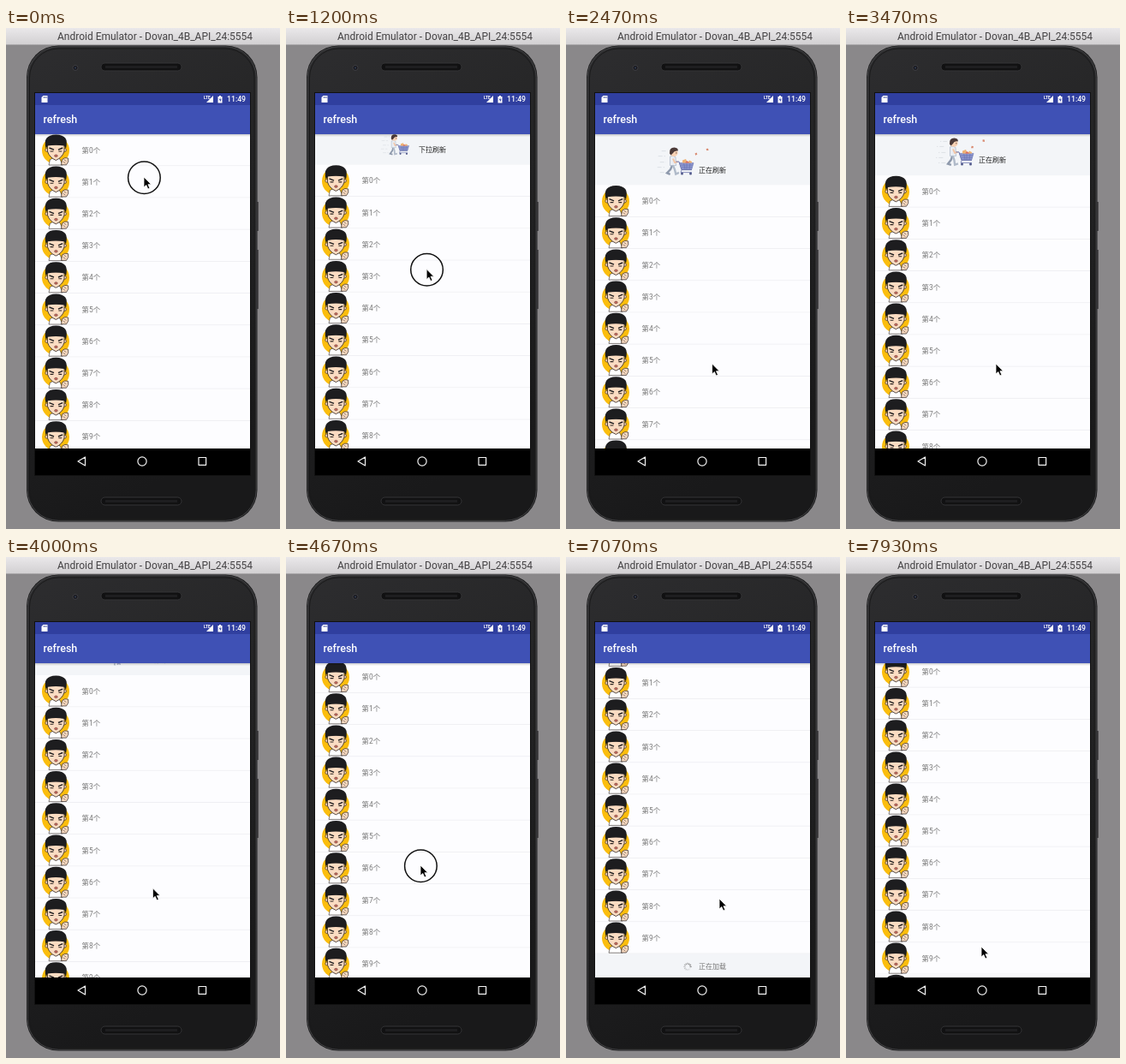
An HTML page for the animation above (8000 ms loop, 320x585 px).

```html
<!DOCTYPE html>
<html lang="zh">
<head>
<meta charset="utf-8">
<style>
html, body { margin: 0; width: 100%; height: 100%; overflow: hidden; background: #8a888a; }
svg { display: block; width: 320px; height: 585px; }
text { font-family: Roboto, "Noto Sans CJK SC", "Noto Sans CJK", sans-serif; }
.item { font-size: 8.4px; fill: #777; }
.note { font-size: 8px; text-anchor: middle; }
</style>
</head>
<body>
<svg viewBox="0 0 320 585">
  <defs>
    <linearGradient id="bar" x2="0" y2="1">
      <stop stop-color="#eae8ea"/><stop offset="1" stop-color="#d2d0d2"/>
    </linearGradient>
    <linearGradient id="body" x2=".25" y2="1">
      <stop stop-color="#2d2d2f"/><stop offset=".4" stop-color="#252526"/><stop offset="1" stop-color="#19191a"/>
    </linearGradient>
    <linearGradient id="shade" x2="0" y2="1">
      <stop stop-color="#000" stop-opacity=".2"/><stop offset="1" stop-color="#000" stop-opacity="0"/>
    </linearGradient>
    <clipPath id="view"><rect x="34" y="124" width="251" height="367"/></clipPath>

    <g id="avatar">
      <circle cx="58" cy="18.8" r="16" fill="#fbbd0d"/>
      <path d="M50 36L51.5 29.5Q58 26 63 29L66 36Z" fill="#fff" stroke="#332b28" stroke-width=".6"/>
      <circle cx="47.8" cy="18.5" r="1.9" fill="#f9d3b4" stroke="#2a2220" stroke-width=".6"/>
      <circle cx="68.6" cy="18.5" r="1.9" fill="#f9d3b4" stroke="#2a2220" stroke-width=".6"/>
      <path d="M48.5 12H68V20Q66 27 58.3 30.5Q50.5 27 48.5 20Z" fill="#fbdcc2" stroke="#2a2220" stroke-width=".8"/>
      <path d="M46.6 17Q44.5 8 47.5 4.5Q50 .6 58.5 .4Q66.5 .6 69.3 4.5Q72 8 70 17L68 13.6Q58 12 48.6 13.6Z" fill="#1d1d1f"/>
      <path d="M50.5 16L56 18.2M66.2 16L61 18.2" stroke="#1d1d1f" stroke-width="1.4"/>
      <path d="M51.6 20H55.4M61.4 20H65.2" stroke="#2a2220" stroke-width="1.1"/>
      <ellipse cx="58.4" cy="25.2" rx="1.8" ry="1.3" fill="#cf6f62" stroke="#4a2a26" stroke-width=".5"/>
      <path d="M64.5 35.8L65.5 29.5Q68.5 26.5 72.5 28Q74 32 70.5 35.8Z" fill="#fbdcc2" stroke="#2a2220" stroke-width=".7"/>
      <path d="M67.5 29.5L70.5 31.5M66.7 32L69.5 34" stroke="#2a2220" stroke-width=".5"/>
    </g>

    <g id="cart">
      <path d="M12.5 -15.5H16L19 -6H31" fill="none" stroke="#6c75ad" stroke-width="1"/>
      <path d="M16.5 -14H33L30.8 -6.5H19Z" fill="#8e98d0" stroke="#6c75ad" stroke-width=".6"/>
      <path d="M18 -11.5H32M18.7 -9H31.5M21.5 -14L23 -6.5M25 -14V-6.5M29 -14L28 -6.5" stroke="#5e68a8" stroke-width=".5"/>
      <path d="M20 -14V-17L24 -18.5L26 -14ZM26 -14L28 -17L31 -15.5V-14Z" fill="#efb273"/>
      <path d="M23 -14L25.5 -16.5L28 -14Z" fill="#d9695f"/>
      <path d="M19 -6L18 -3H31" fill="none" stroke="#6c75ad" stroke-width=".8"/>
      <circle cx="19.5" cy="-1.5" r="1.5" fill="#535b8c"/><circle cx="29.5" cy="-1.5" r="1.5" fill="#535b8c"/>
    </g>
  </defs>

  <rect width="320" height="585" fill="#8a888a"/>
  <rect width="320" height="19" fill="url(#bar)"/>
  <path d="M0 19.5H320" stroke="#aaa8aa"/>
  <text x="174" y="14" font-size="12" text-anchor="middle" fill="#454345">Android Emulator - Dovan_4B_API_24:5554</text>

  <path d="M294 203V237M294 259V328" stroke="#4c4b4d" stroke-width="2"/>
  <rect x="24" y="20.5" width="269.5" height="556" rx="37" fill="#19191a"/>
  <rect x="25.2" y="21.7" width="267" height="553.6" rx="36" fill="url(#body)" stroke="#49494b" stroke-width=".9"/>
  <rect x="27.5" y="24" width="262.5" height="549" rx="34" fill="none" stroke="#1a1a1b"/>
  <g id="speakers"></g>
  <circle cx="81" cy="46.5" r="3" fill="#18181c" stroke="#3e3e44"/>
  <circle cx="81" cy="46.5" r="1" fill="#34405a"/>

  <rect x="33" y="75" width="253" height="448" fill="#111"/>
  <rect x="34" y="124" width="251" height="367" fill="#fdfdff"/>
  <g clip-path="url(#view)">
    <g id="header">
      <rect x="34" y="-100" width="251" height="100" fill="#f3f5f8"/>
      <g id="walker">
        <path id="wind" d="M2 -28H10M-2 -22H8M0 -15H9M-3 -9H7M0 -3H9" stroke="#d5d9df" stroke-width=".7" stroke-dasharray="5 2"/>
        <g transform="translate(2.5 0)">
          <path id="legB" d="M0 0V6L-2 11.5H2" transform="translate(14 -12)" fill="none" stroke="#8e99ac" stroke-width="2.4"/>
          <path id="legA" d="M0 0V6L-1 11.5H3" transform="translate(14 -12)" fill="none" stroke="#b0bac9" stroke-width="2.4"/>
          <path d="M11 -21.5Q14 -23.5 17.5 -21L18 -11H11Z" fill="#e9edf3" stroke="#9caabd" stroke-width=".6"/>
          <path d="M14.5 -19L16.5 -14.5L20 -15.5" fill="none" stroke="#f3c5a5" stroke-width="1.9"/>
          <ellipse cx="15.5" cy="-26" rx="4.6" ry="4.4" fill="#f8d2b5"/>
          <path d="M10.5 -25Q9.8 -32 16 -32Q21 -31.5 20.2 -28Q16 -29 14.5 -25.5L12 -23Z" fill="#4b3a38"/>
          <path d="M18.3 -26.5V-25" stroke="#4b3a38" stroke-width=".8"/>
        </g>
        <use href="#cart" x="8"/>
        <g id="goods">
          <path d="M0 -1.5L2 0L0 1.5L-1.5 0Z" fill="#d98a70"/>
          <path d="M0 -1.5L2 0L0 1.5L-1.5 0Z" fill="#d98a70"/>
        </g>
      </g>
      <text id="hint" class="note" x="171" y="-15" fill="#222"></text>
    </g>
    <g id="list"></g>
    <g id="footer">
      <rect x="34" width="251" height="60" fill="#f3f5f8"/>
      <g id="spinner"></g>
      <text class="note" x="171" y="18" fill="#777">正在加载</text>
    </g>
  </g>
  <rect x="34" y="124" width="251" height="3" fill="url(#shade)"/>

  <rect x="34" y="76" width="251" height="14" fill="#303f9f"/>
  <rect x="34" y="90" width="251" height="34" fill="#3f51b5"/>
  <text x="43.5" y="111.3" font-size="12.5" font-weight="500" fill="#fff">refresh</text>
  <path d="M43.5 79H48.5V87H41.5V81Z" fill="#fff"/>
  <path d="M44 80V82M45.6 80V82M47.2 80V82" stroke="#303f9f" stroke-width=".7"/>
  <path d="M242 79V87H234Z" fill="#fff"/>
  <text x="231" y="83" font-size="4.8" font-weight="700" fill="#fff">LTE</text>
  <path d="M247.5 80H249V79H251V80H252.5V87.5H247.5Z" fill="#fff"/>
  <path d="M250.5 81L248.8 84.2H250V86.5L251.5 83.3H250.3Z" fill="#303f9f"/>
  <text x="258" y="86.2" font-size="8.7" font-weight="500" fill="#fff">11:49</text>

  <rect x="34" y="491" width="251" height="31" fill="#000"/>
  <g fill="none" stroke="#f2f2f2" stroke-width="1.2" stroke-linejoin="round">
    <path d="M92.5 501V511L84 506Z"/><circle cx="159" cy="506" r="5.1"/><rect x="225" y="501.5" width="8.6" height="8.8"/>
  </g>

  <g id="cursor">
    <circle id="touch" cx=".4" cy=".8" r="18.8" fill="none" stroke="#111" stroke-width="1.5"/>
    <path d="M0 0V12L2.8 9.5L4.8 14L6.9 13L4.9 8.7H8.6Z" fill="#000" stroke="#fff" stroke-width=".8"/>
  </g>
</svg>
<script>
const LOOP = 8000, ROW = 37.2, TOP = 124, LOADED = 7200;
const $ = id => document.getElementById(id);
const move = (id, x, y, more = '') => $(id).setAttribute('transform', `translate(${x} ${y}) ${more}`);
const show = (el, on) => el.setAttribute('visibility', on ? 'inherit' : 'hidden');

// Tracks: time, then the values reached at that time.
const pointer = [[0, 161, 174], [200, 161, 174], [1800, 166, 346], [2400, 170, 392], [3000, 175, 392],
  [3900, 175, 392], [4400, 157, 366], [4600, 157, 365], [4670, 157, 360], [5450, 170, 289], [5730, 171, 289],
  [6250, 171, 310], [6350, 172, 370], [6750, 178, 395], [7070, 179, 399], [7250, 177, 415], [7800, 158, 455], [8000, 158, 455]];
const pullTrack = [[200, 0], [1800, 57.4], [2400, 72.7], [2500, 54], [2650, 48.4], [3850, 48.4], [3980, 16], [4150, 0]];
const scrollTrack = [[4600, 0], [4670, 2.4], [5200, 38.8], [6400, 38.8], [6750, 32.6], [7250, 32.6], [7750, 8.6]];
const presses = [[0, 2400], [4450, 5500], [6350, 6750], [7250, 7750]];

function sample(track, t) {
  const next = track.findIndex(key => key[0] > t);
  if (next === 0) return track[0].slice(1);
  if (next < 0) return track.at(-1).slice(1);
  const a = track[next - 1], b = track[next], k = (t - a[0]) / (b[0] - a[0]);
  return a.slice(1).map((v, i) => v + (b[i + 1] - v) * k);
}

$('speakers').innerHTML = [41, 548].map(y =>
  `<rect x="111" y="${y}" width="94" height="9" rx="4.5" fill="#111112" stroke="#343436"/>
   <path d="M116 ${y + 4.5}H200" stroke="#1e1e20" stroke-width="3"/>`).join('');

$('list').innerHTML = Array.from({ length: 12 }, (_, i) =>
  `<g transform="translate(0 ${i * ROW})">
    <rect x="34" width="251" height="${ROW}" fill="#fdfdff"/>
    <path d="M34 36.9H285" stroke="#e9e9ec" stroke-width=".8"/>
    <use href="#avatar"/><text class="item" x="88.6" y="21.5">第${i}个</text>
  </g>`).join('');
const rows = [...$('list').children];

$('spinner').innerHTML = Array.from({ length: 12 }, (_, i) =>
  `<path d="M0 -4.6V-2.6" transform="rotate(${i * 30})" stroke="#777" stroke-width="1.1" opacity="${0.1 + i * 0.08}"/>`).join('');

function drawHeader(t, pull) {
  const refreshing = t >= 2400;
  const swing = refreshing ? Math.sin(t / 75) * 24 : 16;
  const size = Math.min(1, pull / 48.4);
  $('hint').textContent = refreshing ? '正在刷新' : pull > 48.4 ? '松手可刷新' : '下拉刷新';
  move('walker', 128 - 20 * size, -12, `scale(${size})`);
  move('legA', 14, -12, `rotate(${-swing})`);
  move('legB', 14, -12, `rotate(${swing})`);
  $('wind').setAttribute('stroke-dashoffset', refreshing ? t / 30 % 7 : 0);
  [...$('goods').children].forEach((piece, i) => {
    const k = (t / 600 + i * 0.5) % 1;
    show(piece, refreshing);
    piece.setAttribute('transform', `translate(${60 - 26 * k} ${-30 + 14 * k * k}) rotate(${k * 180})`);
  });
}

function draw(now) {
  const t = now % LOOP;
  const [pull] = sample(pullTrack, t), [scroll] = sample(scrollTrack, t);
  const top = TOP + pull - scroll, loaded = t >= LOADED;
  move('header', 0, top);
  move('list', 0, top);
  move('footer', 0, top + 10 * ROW);
  rows.forEach((row, i) => show(row, loaded || i < 10));
  show($('footer'), !loaded);
  drawHeader(t, pull);
  move('spinner', 142, 15, `rotate(${Math.floor(t / 80) * 30})`);
  move('cursor', ...sample(pointer, t));
  show($('touch'), presses.some(([from, to]) => t >= from && t < to));
  requestAnimationFrame(frame);
}

let start;
function frame(now) {
  start ??= now;
  draw(now - start);
}
draw(0);
</script>
</body>
</html>
```
